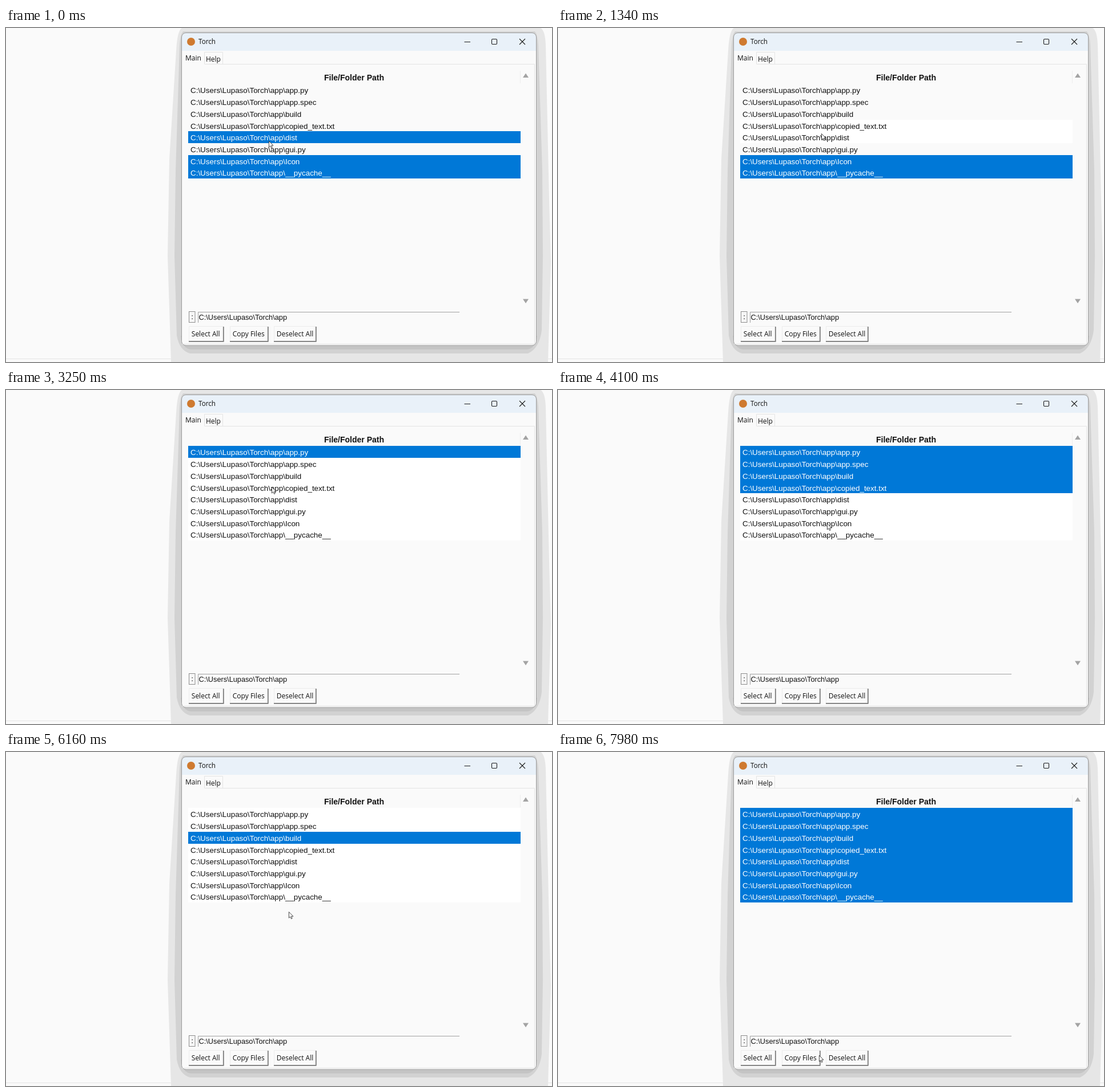
An HTML page for the animation above (8000 ms loop, 956 by 586 pixels).

```html
<!DOCTYPE html>
<html lang="en">
<head>
<meta charset="utf-8">
<title>Torch</title>
<style>
  html, body { margin: 0; width: 100%; height: 100%; overflow: hidden; background: #fafafa; }
  svg { display: block; width: 956px; height: 586px; }
  text { fill: #111; white-space: pre; }
  .ui { font: 12px "Open Sans", "Noto Sans", sans-serif; }
  .list { font: 13.4px "Liberation Sans", Arial, sans-serif; }
  .head { font: bold 14px "Liberation Sans", Arial, sans-serif; }
  .entry { font: 12.75px "Liberation Sans", Arial, sans-serif; }
  .line { fill: none; stroke: #e4e4e4; }
  .icon { fill: none; stroke: #1c1c1c; stroke-width: 1.1; }
  .bar { shape-rendering: crispEdges; }
</style>
</head>
<body>
<svg viewBox="0 0 956 586">
  <rect width="956" height="586" fill="#fafafa"/>
  <path class="line" d="M0 580.5H956"/>

  <!-- banded window shadow -->
  <path fill="#e6e6e6" d="M308 0H936Q944 4 945 30L951 300L954 410L949 586H289L283 400L286 230L298 40Q300 4 308 0Z"/>
  <path fill="#d2d2d2" d="M310 6H926Q931 12 932 30L939 250L940 400L938 530Q934 562 914 571H322Q304 566 299 540L295 400L297 250L304 30Q305 12 310 6Z"/>
  <path fill="#c4c4c4" d="M306 540H930Q928 562 912 564H324Q308 562 306 540Z"/>

  <!-- window -->
  <rect x="307.5" y="8.5" width="621" height="548.5" rx="7.5" fill="#fafafa"/>
  <path fill="#e9f1f9" d="M307.5 40V16a7.5 7.5 0 0 1 7.5-7.5H921a7.5 7.5 0 0 1 7.5 7.5V40Z"/>
  <rect x="307.5" y="8.5" width="621" height="548.5" rx="7.5" fill="none" stroke="#9c9c9c"/>
  <circle cx="324" cy="24" r="7" fill="#cf7a30"/>
  <text class="ui" x="337" y="28" style="font-size:11.7px">Torch</text>
  <path class="icon" d="M802.5 24.5H813M899 19L909 29M909 19L899 29"/>
  <rect class="icon" x="850.5" y="19.5" width="9" height="9" rx="1.5"/>

  <!-- tabs -->
  <path class="line" d="M347.5 63V42.5H379.5V63M347.5 63.5H925.5V554.5H309"/>
  <text class="ui" x="314" y="56.5">Main</text>
  <text class="ui" x="350" y="58.5">Help</text>

  <!-- list -->
  <text class="head" x="609.5" y="91.5" text-anchor="middle">File/Folder Path</text>
  <path class="line" d="M900.5 75V97" opacity=".6"/>
  <path fill="#a3a3a3" d="M905 87L910 79.5L915 87ZM905 475.5L910 483L915 475.5Z"/>
  <g id="rows"></g>

  <!-- path entry -->
  <rect x="320.5" y="497.5" width="10.5" height="19" fill="#f6f6f6" stroke="#8c8c8c"/>
  <text class="ui" x="324.5" y="511">:</text>
  <path fill="none" stroke="#a0a0a0" d="M336.5 517V498.5H794"/>
  <text class="entry" x="337.5" y="512">C:\Users\Lupaso\Torch\app</text>

  <g id="buttons"></g>
  <path id="cursor" d="M.4 .4V11L2.8 8.8L4.5 12.5L6.2 11.8L4.6 8.1H7.9Z" fill="#fff" stroke="#333" stroke-width=".9"/>
</svg>

<script>
const LOOP = 8000;
const $ = id => document.getElementById(id);

function add(parent, tag, attrs, text) {
  const el = document.createElementNS('http://www.w3.org/2000/svg', tag);
  for (const k in attrs) el.setAttribute(k, attrs[k]);
  if (text) el.textContent = text;
  return parent.appendChild(el);
}

const files = ['app.py', 'app.spec', 'build', 'copied_text.txt', 'dist', 'gui.py', 'Icon', '__pycache__'];
const rowTop = i => Math.round(98.4 + 20.7 * i);
const rows = files.map((name, i) => {
  const y = rowTop(i);
  return {
    bar: add($('rows'), 'rect', { class: 'bar', x: 319, y, width: 582, height: rowTop(i + 1) - y }),
    label: add($('rows'), 'text', { class: 'list', x: 323, y: y + 16.3 }, 'C:\\Users\\Lupaso\\Torch\\app\\' + name)
  };
});

function button(x, w, text) {
  const y = 523, h = 27, g = add($('buttons'), 'g', {});
  const light = add(g, 'path', { d: `M${x + .5} ${y + h}V${y + .5}H${x + w}`, fill: 'none' });
  const dark = add(g, 'path', { d: `M${x + w - .2} ${y + 1}V${y + h - .2}H${x}`, fill: 'none', 'stroke-width': 1.7 });
  const label = add(g, 'text', { class: 'ui', x: x + 4.8, y: 541 }, text);
  return down => {
    light.setAttribute('stroke', down ? '#767676' : '#ececec');
    dark.setAttribute('stroke', down ? '#ececec' : '#767676');
    label.setAttribute('transform', down ? 'translate(1 1)' : '');
  };
}
const pressAll = button(320, 61, 'Select All');
button(392, 67, 'Copy Files')(false);
button(469, 74, 'Deselect All')(false);

// selection rules: (row, clicked row, anchor, was selected) => selected
const toggle = (i, row, anchor, on) => on !== (i === row);
const pick = (i, row) => i === row;
const extend = (i, row, anchor) => i >= anchor && i <= row;
const all = () => true;

const clicks = [
  [470, toggle, 3], [960, toggle, 3], [1340, toggle, 4], [1820, toggle, 7],
  [2900, pick, 0], [3570, extend, 3], [4220, extend, 6], [4800, extend, 3],
  [5210, extend, 2], [5840, pick, 2], [7140, all]
];

// Replays the clicks; every click repaints the span of rows it changed.
function listAt(t) {
  let on = files.map((_, i) => i === 4 || i > 5), anchor = 0;
  const painted = files.map(() => false);
  for (const [at, rule, row] of clicks) {
    if (at > t) break;
    if (rule === pick) anchor = row;
    const next = on.map((was, i) => rule(i, row, anchor, was));
    const changed = next.map((v, i) => v !== on[i]);
    painted.fill(true, changed.indexOf(true), changed.lastIndexOf(true) + 1);
    on = next;
  }
  return { on, painted };
}

// pointer moves: start, end, x, y
const moves = [
  [120, 330, 456, 169], [700, 780, 453, 162], [990, 1190, 461, 185], [1460, 1780, 466, 249],
  [1990, 2780, 472, 113], [3080, 3250, 465, 170], [3870, 4100, 471, 234], [4420, 4960, 466, 149],
  [5550, 5720, 467, 154], [6010, 6160, 495, 279], [6160, 6400, 480, 563], [6400, 6790, 350, 537],
  [7780, 7980, 457, 532]
];

function pointAt(t) {
  let x = 460, y = 198;
  for (const [from, to, toX, toY] of moves) {
    const k = Math.min(1, Math.max(0, (t - from) / (to - from)));
    x += (toX - x) * k;
    y += (toY - y) * k;
  }
  return [x, y];
}

function draw(t) {
  const { on, painted } = listAt(t);
  rows.forEach(({ bar, label }, i) => {
    bar.style.fill = on[i] ? '#0078d7' : painted[i] ? '#fff' : 'none';
    label.style.fill = on[i] ? '#fff' : '#111';
  });
  pressAll(t >= 6990 && t < 7140);
  $('cursor').setAttribute('transform', `translate(${pointAt(t)})`);
}

const start = performance.now();
function tick() {
  draw((performance.now() - start) % LOOP);
  requestAnimationFrame(tick);
}
tick();
</script>
</body>
</html>
```
